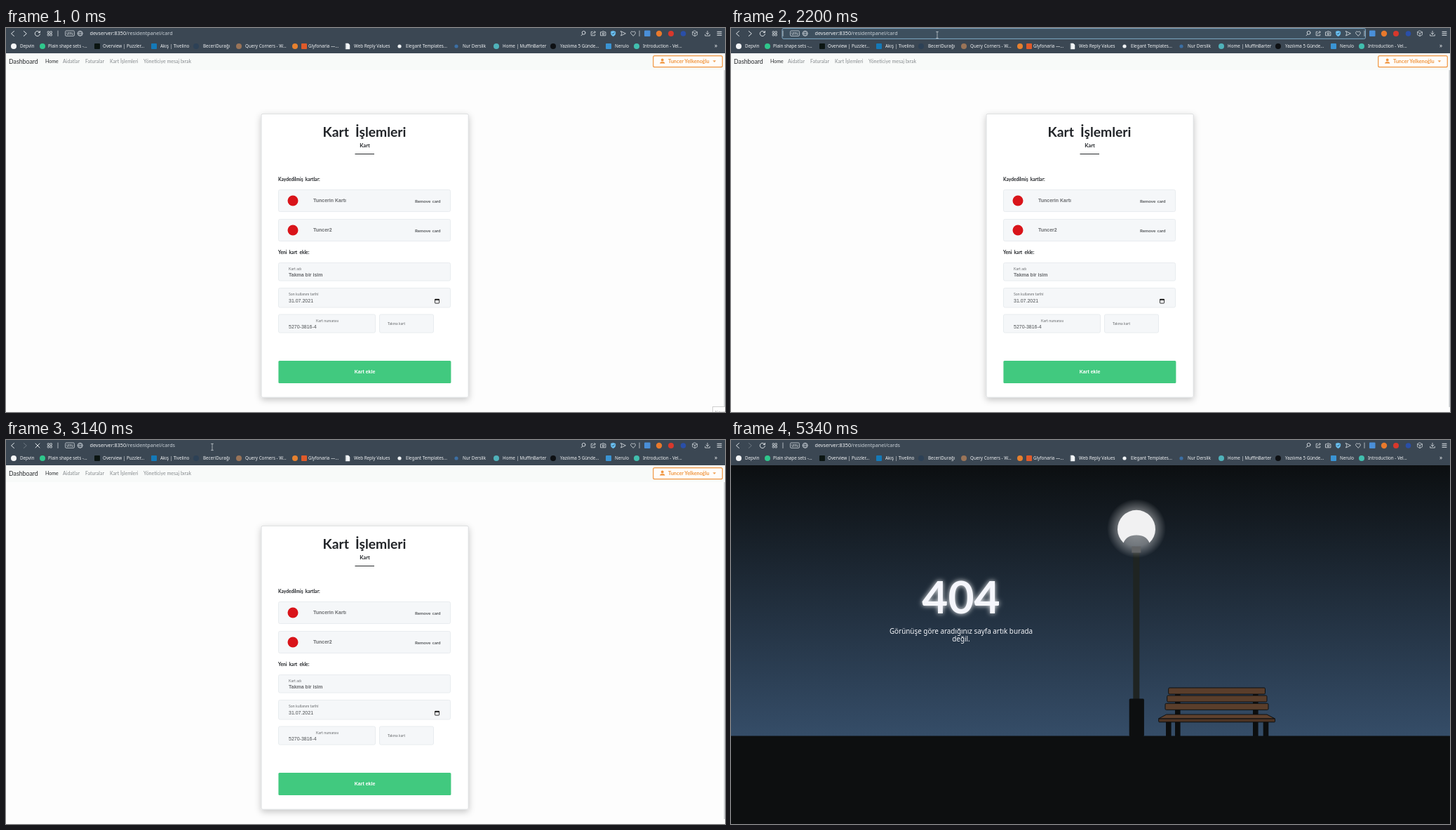
Animation of 1025x547 px, one loop 5.47 s. Source, as an HTML page:

```html
<!DOCTYPE html>
<html lang="tr">
<head>
<meta charset="utf-8">
<title>Kart</title>
<style>
html, body { margin: 0; width: 100%; height: 100%; overflow: hidden; background: #fdfdfd; }
svg { display: block; width: 100%; height: 100%; }
text { white-space: pre; }
</style>
</head>
<body>
<svg id="stage" viewBox="0 0 1025 547" preserveAspectRatio="none">
  <defs>
    <linearGradient id="sky" x1="0" y1="0" x2="0" y2="1">
      <stop offset="0" stop-color="#0c0f11"/><stop offset="1" stop-color="#354d68"/>
    </linearGradient>
    <radialGradient id="glow">
      <stop offset="0" stop-color="#fff" stop-opacity=".55"/>
      <stop offset=".6" stop-color="#fff" stop-opacity=".38"/>
      <stop offset="1" stop-color="#fff" stop-opacity="0"/>
    </radialGradient>
    <filter id="soft" x="-20%" y="-20%" width="140%" height="140%">
      <feDropShadow dx="0" dy="3" stdDeviation="5" flood-color="#000" flood-opacity=".22"/>
    </filter>
    <filter id="neon" x="-30%" y="-40%" width="160%" height="180%">
      <feDropShadow dx="0" dy="0" stdDeviation="3.6" flood-color="#fff" flood-opacity=".9"/>
    </filter>
  </defs>
</svg>
<script>
const LOOP = 5470, TICK = 66.6;
const UI = "'Noto Sans', 'Open Sans', sans-serif";
const LATO = "Lato, 'Open Sans', sans-serif";
const ARIAL = "'Liberation Sans', Arial, sans-serif";
const HOST = 'devserver:8350', PATH = '/residentpanel/card';
const stage = document.getElementById('stage');

const text = (x, y, str, size, fill, { font = UI, weight = 400, anchor = 'start', gap = 0 } = {}) =>
  `<text x="${x}" y="${y}" font-size="${size}" fill="${fill}" font-family="${font}" font-weight="${weight}" text-anchor="${anchor}" word-spacing="${gap}">${str}</text>`;
const rect = (x, y, w, h, fill, rx = 0, stroke = 'none', sw = 1) =>
  `<rect x="${x}" y="${y}" width="${w}" height="${h}" rx="${rx}" fill="${fill}" stroke="${stroke}" stroke-width="${sw}"/>`;
const circle = (x, y, r, fill, stroke = 'none') =>
  `<circle cx="${x}" cy="${y}" r="${r}" fill="${fill}" stroke="${stroke}"/>`;
const line = (d, stroke = '#dfe4e8', sw = 1, fill = 'none') =>
  `<path d="${d}" stroke="${stroke}" stroke-width="${sw}" fill="${fill}" stroke-linecap="round" stroke-linejoin="round"/>`;
const at = (x, y, body) => `<g transform="translate(${x} ${y})">${body}</g>`;
const group = (id, body) => `<g id="${id}">${body}</g>`;

// icons centred on 0,0
const magnifier = (color = '#dfe4e8') => line('M-3 3L-1 1M3 -1a2.4 2.4 0 1 1 -4.8 0a2.4 2.4 0 1 1 4.8 0', color, .9);
const globe = circle(0, 0, 3.5, 'none', '#c3cad1') + line('M-3.5 0H3.5M0 -3.5C-2.2 -1.5 -2.2 1.5 0 3.5C2.2 1.5 2.2 -1.5 0 -3.5', '#c3cad1', .7);
const share = line('M-1 -2.5H-3V3H2.5V1M-1 1C-.8 -1 .5 -2 3 -2M1.5 -3.5L3 -2L1.5 -.5', '#dfe4e8', .8);
const camera = line('M-3.5 -2H-1.5L-1 -3H1L1.5 -2H3.5V3H-3.5Z', '#dfe4e8', .8) + circle(0, .4, 1.3, 'none', '#dfe4e8');
const shield = line('M0 -3.5L3.2 -2.5V0C3.2 2 1.6 3.3 0 4C-1.6 3.3 -3.2 2 -3.2 0V-2.5Z', '#6cc3f5', .5, '#6cc3f5') + line('M-1.4 0L-.3 1.2L1.6 -1.2', '#24435c', .9);
const send = line('M-3.2 -3.2L3.6 0L-3.2 3.2L-2 0Z', '#dfe4e8', .8);
const heart = line('M0 3.3L-3.2 0C-4.3 -2 -1.5 -4.2 0 -1.8C1.5 -4.2 4.3 -2 3.2 0Z', '#dfe4e8', .8);
const cube = line('M0 -3.8L3.4 -2V2L0 3.8L-3.4 2V-2ZM-3.4 -2L0 -.2L3.4 -2M0 -.2V3.8', '#dfe4e8', .7);
const download = line('M0 -3.5V1.2M-2 -.8L0 1.2L2 -.8M-3.3 1.5V3.3H3.3V1.5', '#dfe4e8', .8);
const menu = line('M-3 -2.5H3M-3 0H3M-3 2.5H3');

function toolRow(tools, x0) {
  return tools.map((icon, i) => at(x0 + i * 14.2, 7.8, icon)).join('');
}

function address(x, path, pathFill) {
  return text(x, 10, `${HOST}<tspan fill="${pathFill}">${path}</tspan>`, 7.2, '#f4f6f8');
}

// [icon x, colour, square?, label x, label]
const bookmarks = [
  [11, '#f4f6f8', 0, 20, 'Depvin'],
  [52, '#2fc78c', 0, 60, 'Plain shape sets -...'],
  [130, '#0b1512', 1, 138, 'Overview | Puzzler...'],
  [211, '#1479b8', 1, 220, 'Akış | Tivelino'],
  [271, '#2d4156', 0, 281, 'BeceriDurağı'],
  [332, '#9a7458', 0, 341, 'Query Corners - W...'],
  [412, '#e6812f', 0, 0, ''],
  [425, '#df5a2a', 1, 431, 'Glyfonaria —...'],
  [487, '', 0, 496, 'Web Reply Values'],
  [561, '#f0f3f5', 0, 570, 'Elegant Templates...'],
  [642, '#3c6fa4', 0, 651, 'Nur Derslik'],
  [699, '#4fb2ba', 0, 708, 'Home | MuffinBarter'],
  [780, '#0d1013', 0, 790, 'Yazılıma 5 Günde...'],
  [859, '#3a94d4', 1, 868, 'Nerulo'],
  [899, '#41bfae', 0, 908, 'Introduction - Vel...']
];

function bookmark([ix, color, square, tx, label]) {
  const r = ix === 561 || ix === 642 ? 2.6 : 4;
  const icon = !color ? line(`M${ix - 2.5} 22H${ix + 1}L${ix + 3} 24V30H${ix - 2.5}Z`, '#f0f3f5', .5, '#f0f3f5')
    : square ? rect(ix - 4, 22, 8, 8, color, 1) : circle(ix, 26, r, color);
  return icon + text(tx, 28.2, label, 6.25, '#f1f3f5');
}

const chrome =
  rect(0, 0, 1025, 36, '#3b4753') +
  group('hoverBar', rect(73, 1, 831, 14, '#40515f', 2)) +
  group('focusBar', rect(73, .6, 831.5, 14.8, '#3d4f5e', 2, '#7fa9c6', 1)) +
  group('editBar', rect(73, 0, 831, 18, '#333e4a')) +
  line('M11.5 4.5L7.5 8L11.5 11.5') +
  group('forward', line('M25.3 4.5L29.3 8L25.3 11.5')) +
  group('reload', line('M48 6.2A3.6 3.6 0 1 0 48.4 8.8M48.4 4.4V6.6H46.2')) +
  group('stop', line('M42 5L48 11M48 5L42 11')) +
  [59.2, 62.9].map(x => [4.8, 8.5].map(y => rect(x, y, 2.5, 2.5, 'none', .4, '#dfe4e8', .8)).join('')).join('') +
  group('badge', line('M74 4V11.5', '#cfd5da', .8) + rect(84.5, 4, 13, 7.4, 'none', 1.5, '#cdd4da', .8) +
    text(91, 9.8, 'VPN', 5, '#dfe4e8', { anchor: 'middle' }) + at(105.7, 7.8, globe)) +
  group('bareGlobe', at(87.7, 7.8, globe)) +
  group('tools', toolRow([magnifier(), share, camera, shield, send, heart], 823) + line('M903 4V11.5', '#cfd5da', .8)) +
  group('fewTools', toolRow([magnifier(), share, camera, shield, send], 837)) +
  rect(910, 3.5, 8.5, 8.5, '#4a8fd8', 1) + circle(931, 8, 4.2, '#e8792c') +
  circle(948, 8, 4, '#d8382c') + circle(965.5, 8, 3.8, '#2a4fa8') +
  at(982, 7.8, cube) + at(1000, 7.8, download) + at(1017, 7.8, menu) +
  bookmarks.map(bookmark).join('') +
  text(1012, 28.3, '»', 8, '#f1f3f5', { anchor: 'middle' }) +
  group('urlCard', address(119.5, PATH, '#cbd2d8')) +
  group('urlCards', address(119.5, PATH + 's', '#cbd2d8')) +
  group('urlEdit', address(101, PATH + 's', '#f4f6f8')) +
  group('caret', rect(239, 1.5, 1, 11, '#f4f6f8')) +
  group('editCaret', rect(224.6, 1.5, 1, 11, '#f4f6f8'));

const field = (x, y, w, h) => rect(x + .5, y + .5, w - 1, h - 1, '#f5f7f9', 2, '#e8ecef');
const bold = (x, y, str) => text(x, y, str, 6.6, '#1f2226', { font: LATO, weight: 700, gap: 1.5 });
const label = (x, y, str) => text(x, y, str, 5.25, '#6a6d70', { font: LATO });
const value = (x, y, str, weight = 700, fill = '#6b6d70') => text(x, y, str, 7, fill, { font: ARIAL, weight });
const digits = (x, y, str) => value(x, y, str, 400, '#4a4d50');
const savedCard = (y, name) => field(388, y, 246, 32) + circle(409, y + 16, 7.5, '#d9141a') +
  value(438, y + 18.3, name) + text(583, y + 18.6, 'Remove card', 6.2, '#55585b', { font: LATO, weight: 700, gap: 1 });

const navItems = [[56, 'Home', '#25282b'], [81, 'Aidatlar', '#868b8e'], [113, 'Faturalar', '#868b8e'],
  [148, 'Kart İşlemleri', '#868b8e'], [196, 'Yöneticiye mesaj bırak', '#868b8e']];

const cardPage =
  rect(0, 36, 1025, 511, '#fdfdfd') + rect(0, 36, 1025, 24, '#f8faf9') +
  text(4, 51.2, 'Dashboard', 8.75, '#25282b', { font: LATO }) +
  navItems.map(([x, str, fill]) => text(x, 50.4, str, 7, fill, { font: LATO })).join('') +
  rect(922.7, 39.7, 98.6, 16, '#fffdfa', 2, '#f0953f', 1.2) +
  circle(935.7, 45.4, 1.9, '#f0953f') + line('M932.5 50C932.5 47.5 939 47.5 939 50Z', '#f0953f', .6, '#f0953f') +
  text(944, 50.2, 'Tuncer Yelkenoğlu', 7.3, '#f0953f', { font: LATO, weight: 700 }) +
  line('M1008.3 46.5H1011.7L1010 48.4Z', '#f0953f', .4, '#f0953f') +
  rect(1023.5, 60, 1.5, 480, '#c9cccf') +
  `<g filter="url(#soft)">${rect(364, 122.3, 295.2, 403.9, '#fff', 2, '#d9dbdd')}</g>` +
  text(511, 155.2, 'Kart İşlemleri', 19.3, '#212428', { font: LATO, weight: 700, anchor: 'middle', gap: 4.5 }) +
  text(511.5, 170, 'Kart', 7.6, '#212428', { font: LATO, weight: 700, anchor: 'middle' }) +
  rect(497.5, 179, 27.5, 1, '#25282b') +
  bold(388, 218, 'Kaydedilmiş kartlar:') +
  savedCard(230, 'Tuncerin Kartı') + savedCard(272, 'Tuncer2') +
  bold(388, 321.7, 'Yeni kart ekle:') +
  field(388, 334, 246, 26.5) + label(403, 344.5, 'Kart adı') + value(403, 353.5, 'Takma bir isim') +
  field(388, 370, 246, 28.5) + label(403, 381, 'Son kullanım tarihi') + digits(403, 390.5, '31.07.2021') +
  rect(611.5, 386.3, 6, 5.8, 'none', .5, '#222', .9) + rect(611.2, 386, 6.6, 1.9, '#222') +
  field(388, 407.5, 139, 27) + label(442, 418.5, 'Kart numarası') + digits(403, 428, '5270-3816-4') +
  field(532, 407.5, 78, 27) + label(544, 422.8, 'Takma kart') +
  rect(388.4, 474, 246, 32, '#41c97f', 1.5) +
  text(511.5, 492.3, 'Kart ekle', 7, '#fff', { font: ARIAL, weight: 700, anchor: 'middle' }) +
  group('toast', rect(1007.5, 539.5, 30, 20, '#fff', 0, '#cfcfcf') + text(1010.5, 550, 'Kayıt', 7, '#a5a5a5'));

const slat = (x, y, w) => rect(x, y, w, 9, '#5a3e2b', 1.5, '#0d0f10', 1);
const legs = (xs, y, h) => xs.map(x => rect(x, y, 7.6, h, '#0c0e0f')).join('');

const lostPage =
  rect(0, 36, 1025, 386, 'url(#sky)') + rect(0, 421.5, 1025, 126, '#0d0f10') +
  rect(573.3, 158, 9, 212, '#1f2422') + rect(567.7, 368.5, 21.2, 53.5, '#0d0f10', 1.5) +
  circle(578, 126, 42, 'url(#glow)') +
  rect(571.3, 151.5, 13, 9, '#626466') +
  '<path d="M559.5 146.5A27 27 0 1 1 596.5 146.5Q592 135.5 578 135.5Q564 135.5 559.5 146.5Z" fill="#f1f1f2"/>' +
  legs([633, 744], 358, 64) + legs([620, 758.7], 400, 22) +
  slat(623.7, 353, 137.8) + slat(621.7, 364, 142.3) + slat(619, 375.3, 147) +
  line('M621 391H764L775.5 397H609.7Z', '#0d0f10', 1, '#5f412d') +
  rect(609.7, 397, 165.8, 4.8, '#4d3424', 1, '#0d0f10', 1) +
  `<g filter="url(#neon)">${text(328, 246.8, '404', 64, '#f5f6fc', { font: LATO, weight: 700, anchor: 'middle' })}</g>` +
  group('message',
    text(328, 275.6, 'Görünüşe göre aradığınız sayfa artık burada', 9.9, '#f5f6fa', { anchor: 'middle' }) +
    text(328, 287.2, 'değil.', 9.9, '#f5f6fa', { anchor: 'middle' }));

const suggestions =
  rect(0, 36, 1025, 511, 'rgba(0,15,28,.6)') +
  `<g filter="url(#soft)">${rect(73, 18, 831, 43.5, '#3a4653', 1)}</g>` +
  rect(73, 18, 831, 19.7, '#98d8fd') +
  circle(87, 28, 7.5, '#fff') + at(87, 28, magnifier('#2d7fc4')) +
  text(98, 30.6, 'Sakin', 7.2, '#27435a') +
  text(121.5, 30.6, HOST + PATH + 's', 7.2, '#27435a') +
  at(87, 48, magnifier('#3f93dd')) +
  text(98, 50.6, 'http://' + HOST + PATH + 's', 7.2, '#fff', { weight: 700 }) +
  text(259, 50.6, '-  Zumbra Search', 7, '#b4bdc6');

stage.insertAdjacentHTML('beforeend',
  group('cardPage', cardPage) + group('lostPage', lostPage) + chrome + group('suggestions', suggestions) +
  group('click', circle(0, 0, 6.5, '#b8b02c')) +
  group('arrow', line('M.5 .5V9L2.6 7.1L4 10.3L5.3 9.7L3.9 6.6H6.7Z', '#111', .7, '#fff')) +
  group('beam', line('M-1.4 -4.6H1.4M0 -4.6V4.6M-1.4 4.6H1.4', '#d3d9dd', .7)));

const parts = Object.fromEntries([...stage.querySelectorAll('g[id]')].map(g => [g.id, g]));
const show = (id, on) => { parts[id].style.display = on ? '' : 'none'; };

// pointer path: [tick, x, y]
const route = [[0, 1012, 560], [1, 1008, 541], [9, 330, 150], [18, 281, 9], [20, 281, 9],
  [26, 294, 10], [61, 294, 10], [70, 972, 397], [74, 1006, 549], [99, 1006, 549]];

function pointer(k) {
  const i = route.findIndex(([end]) => end > k);
  const [k0, x0, y0] = route[i - 1], [k1, x1, y1] = route[i];
  const p = (k - k0) / (k1 - k0), e = p * p * (3 - 2 * p);
  return [x0 + (x1 - x0) * e, y0 + (y1 - y0) * e];
}

function render(ms) {
  const k = Math.floor(ms / TICK);
  const editing = k >= 39 && k < 46, bare = k >= 39 && k < 47, lost = k >= 54;
  const loading = k >= 46 && k < 55, overBar = k >= 18 && k < 62;
  show('cardPage', !lost);
  show('lostPage', lost);
  show('message', k >= 55);
  show('toast', k < 2);
  show('suggestions', editing);
  show('hoverBar', k === 18);
  show('focusBar', k >= 19 && k < 39);
  show('editBar', editing);
  show('reload', !loading);
  show('stop', loading);
  show('badge', !bare);
  show('bareGlobe', bare);
  show('tools', !bare);
  show('fewTools', k === 46);
  show('urlCard', k < 39);
  show('urlCards', k >= 47);
  show('urlEdit', bare);
  show('caret', k >= 19 && k < 33);
  show('editCaret', editing);
  show('click', k >= 19 && k < 22);
  show('arrow', !overBar);
  show('beam', overBar);
  parts.forward.setAttribute('opacity', k >= 47 ? .3 : 1);
  const move = `translate(${pointer(k).map(v => v.toFixed(1)).join(' ')})`;
  for (const id of ['click', 'arrow', 'beam']) parts[id].setAttribute('transform', move);
}

const start = performance.now();
function frame() {
  render((performance.now() - start) % LOOP);
  requestAnimationFrame(frame);
}
render(0);
requestAnimationFrame(frame);
</script>
</body>
</html>
```
